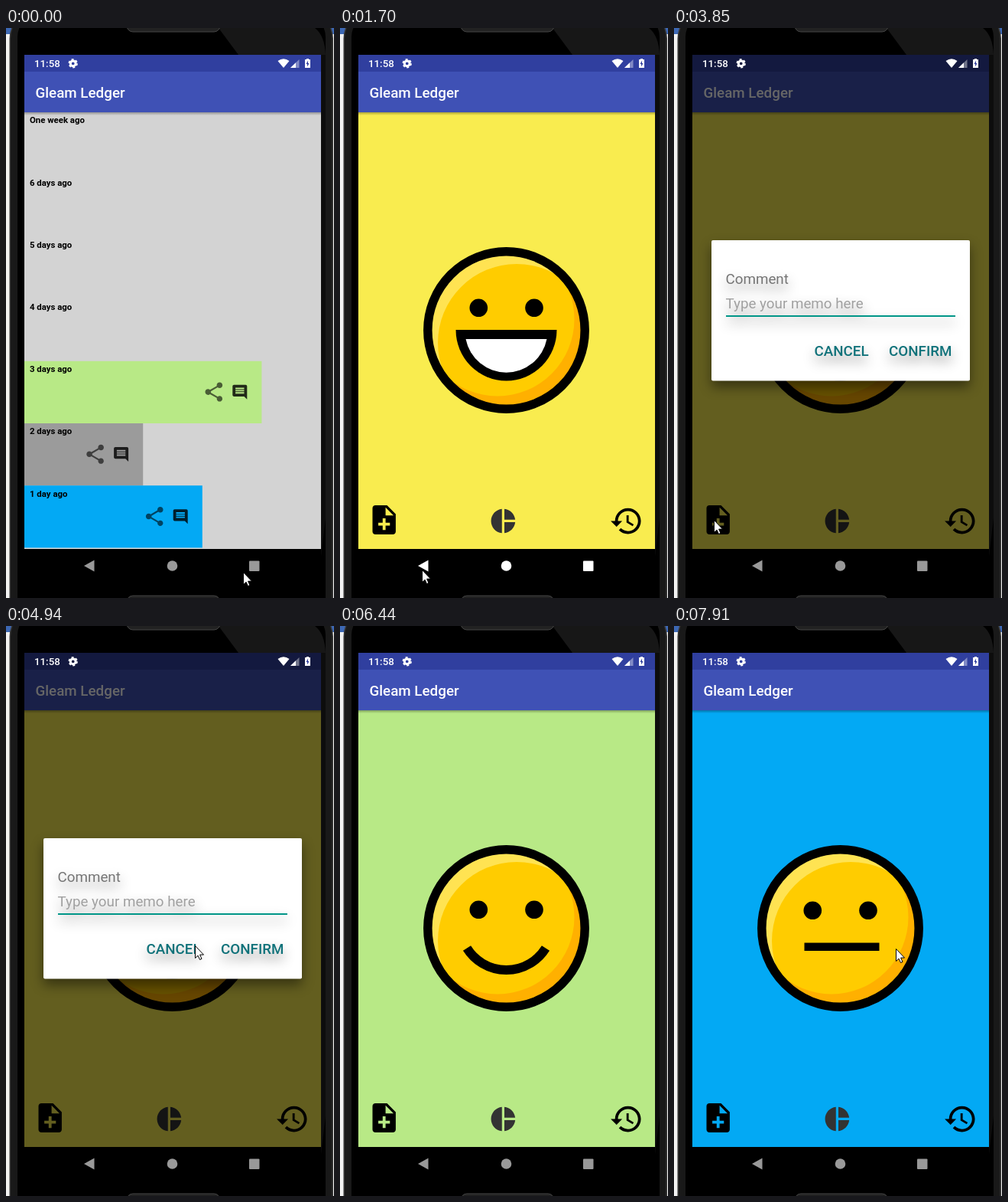
Write an HTML page that moves like this. It is 429 px wide and 744 px high and loops after 8 s.

```html
<!DOCTYPE html>
<html lang="en">
<head>
<meta charset="utf-8">
<title>Gleam Ledger</title>
<style>
html, body { margin: 0; width: 100%; height: 100%; overflow: hidden; background: #f3f3f3; }
svg { display: block; font-family: Roboto, sans-serif; }
.label { font-weight: 700; font-size: 11.4px; }
.big { font-size: 18.8px; }
.medium { font-weight: 500; }
#dialog > g { filter: drop-shadow(0 8px 8px rgba(0, 0, 0, .45)); }
</style>
</head>
<body>
<svg width="429" height="744" viewBox="0 0 429 744">
  <defs>
    <linearGradient id="shade" x2="0" y2="1">
      <stop stop-opacity=".3"/><stop offset="1" stop-opacity="0"/>
    </linearGradient>
    <clipPath id="disc"><circle cx="217.5" cy="394.5" r="99"/></clipPath>
    <path id="share" d="M18 16.08c-.76 0-1.44.3-1.96.77L8.91 12.7c.05-.23.09-.46.09-.7s-.04-.47-.09-.7l7.05-4.11c.54.5 1.25.81 2.04.81 1.66 0 3-1.34 3-3s-1.34-3-3-3-3 1.34-3 3c0 .24.04.47.09.7L8.04 9.81C7.5 9.31 6.79 9 6 9c-1.66 0-3 1.34-3 3s1.34 3 3 3c.79 0 1.5-.31 2.04-.81l7.12 4.16c-.05.21-.08.43-.08.65 0 1.61 1.31 2.92 2.92 2.92s2.92-1.31 2.92-2.92-1.31-2.92-2.92-2.92z"/>
    <path id="memo" d="M22 4c0-1.1-.9-2-2-2H4c-1.1 0-2 .9-2 2v12c0 1.1.9 2 2 2h14l4 4zM18 14H6v-2h12zm0-3H6V9h12zm0-3H6V6h12z"/>
  </defs>

  <!-- phone -->
  <rect width="429" height="8" fill="#3d68b4"/>
  <rect x="4.5" y="-26" width="423.5" height="810" rx="40" fill="#3a3a3a"/>
  <rect x="6" y="-25" width="420.500" height="808" rx="39" fill="#191919"/>
  <rect x="15" y="-20" width="403" height="798" rx="32"/>
  <path d="M278 0H404Q417 10 418 35H304Z" fill="#171717"/>
  <path d="M412 35H418V640L412 690Z" fill="#0d0d0d"/>
  <rect x="158" y="-12" width="122" height="17" rx="8" fill="#222" stroke="#444"/>
  <rect x="158" y="741" width="122" height="17" rx="8" fill="#222" stroke="#444"/>

  <rect id="page" x="24" y="110" width="388" height="570"/>
  <g id="list"></g>

  <g id="mood">
    <g clip-path="url(#disc)">
      <path fill="#ffb000" d="M100 280H340V510H100Z"/>
      <circle cx="206" cy="380" r="100.500" fill="#fc0"/>
      <path fill="#ffe352" fill-rule="evenodd" d="M100 280H340V520H100ZM128 411a103 103 0 0 0 206 0a103 103 0 0 0-206 0Z"/>
    </g>
    <circle cx="217.500" cy="394.500" r="102.700" fill="none" stroke="#000" stroke-width="11.500"/>
    <g id="eyes"><circle cx="181.300" r="11.800"/><circle cx="254" r="11.800"/></g>
    <g id="grin">
      <path d="M151.500 394H283.500A66 66.500 0 0 1 151.500 394Z"/>
      <path fill="#fff" d="M164.500 406H270.500A54 54 0 0 1 164.500 406Z"/>
    </g>
    <path id="smile" fill="none" stroke="#000" stroke-width="12" d="M166 420.500A60.800 60.800 0 0 0 269 420.500"/>
    <path id="flat" d="M170.500 413.500H268.500V424H170.500Z"/>
    <path transform="translate(34.900 619.200) scale(1.900)" d="M14 2H6c-1.100 0-2 .9-2 2v16c0 1.100.9 2 2 2H18c1.100 0 2-.9 2-2V8zm2 14h-3v3h-2v-3H8v-2h3v-3h2v3h3zm-3-7V3.500L18.500 9z"/>
    <path transform="translate(194.400 624.500) scale(1.580)" fill="#333" d="M11 2v20c-5.070-.5-9-4.790-9-10s3.930-9.500 9-10zm2.030 0v8.990H22c-.47-4.740-4.240-8.520-8.970-8.990zm0 11.010V22c4.740-.47 8.500-4.250 8.970-8.990z"/>
    <path transform="translate(352.200 621) scale(1.880)" d="M13 3c-4.970 0-9 4.030-9 9H1l3.890 3.890.07.14L9 12H6c0-3.870 3.130-7 7-7s7 3.130 7 7-3.130 7-7 7c-1.930 0-3.680-.79-4.940-2.060l-1.420 1.420C8.270 19.990 10.510 21 13 21c4.970 0 9-4.030 9-9s-4.030-9-9-9zm-1 5v5l4.280 2.540.72-1.210-3.500-2.080V8z"/>
  </g>

  <!-- app bar -->
  <rect x="24" y="110" width="388" height="4" fill="url(#shade)"/>
  <rect x="24" y="35" width="388" height="22" fill="#303f9f"/>
  <rect x="24" y="57" width="388" height="53" fill="#3f51b5"/>
  <text class="big medium" x="38.500" y="91" fill="#fff">Gleam Ledger</text>

  <g id="dialog">
    <rect x="24" y="35" width="388" height="645" opacity=".6"/>
    <g><rect x="49" y="277" width="338" height="183.500" rx="2" fill="#fff"/></g>
    <g class="big">
      <text x="67.500" y="334" fill="#757575">Comment</text>
      <text x="67.500" y="365.500" fill="#a0a0a0">Type your memo here</text>
      <rect x="68" y="375" width="300" height="2" fill="#009688"/>
      <g class="medium" fill="#10727a">
        <text x="183.500" y="428">CANCEL</text>
        <text x="281" y="428">CONFIRM</text>
      </g>
    </g>
  </g>

  <!-- status bar -->
  <g fill="#fff">
    <text class="medium" x="37" y="51" font-size="13.300">11:58</text>
    <g fill="none" stroke="#fff">
      <circle cx="87.700" cy="46.300" r="3.400" stroke-width="3"/>
      <circle cx="87.700" cy="46.300" r="5.200" stroke-width="2" stroke-dasharray="2.900 2.545"/>
    </g>
    <path d="M355.500 43Q363 37.500 370.500 43L363 52Z"/>
    <path d="M383.500 41V52H372Z" opacity=".4"/>
    <path d="M379 45.300V52H372Z"/>
    <path d="M391 41H393V40H396V41H398V52H391Z"/>
    <path d="M395 42.500L392.500 47H394V50.500L396.500 46H395Z" fill="#303f9f"/>
  </g>

  <!-- navigation -->
  <ellipse id="ripple" cx="109" cy="702.500" rx="47" ry="22.500" fill="#fff" opacity=".15"/>
  <g id="nav">
    <path d="M102 702L115.500 694.500V709.500Z"/>
    <circle cx="217.500" cy="702" r="6.800"/>
    <rect x="318" y="695.500" width="13.500" height="13.500" rx="1"/>
  </g>

  <path id="cursor" fill="#fff" stroke="#000" d="M.5.500V16.500L4.100 13.200L6.500 18.500L9 17.400L6.600 12.100H11.500Z"/>
</svg>

<script>
const $ = id => document.getElementById(id);
const show = (id, on) => $(id).style.display = on ? '' : 'none';

// rows of the week: label, bar width as a share of the page, colour
const rows = [
  ['One week ago'], ['6 days ago'], ['5 days ago'], ['4 days ago'],
  ['3 days ago', .8, '#b8e986'], ['2 days ago', .4, '#9b9b9b'], ['1 day ago', .6, '#03a9f4']
];
$('list').innerHTML = rows.map(([label, part, color], i) => {
  const y = 110 + i * 81.2, right = 24 + 388 * part;
  const bar = part ? `<rect x="24" y="${y}" width="${388 * part}" height="81.2" fill="${color}"/>
    <use href="#share" transform="translate(${right - 77.7} ${y + 25.2}) scale(1.26)" opacity=".6"/>
    <use href="#memo" transform="translate(${right - 40} ${y + 29.1}) scale(.95)" opacity=".82"/>` : '';
  return bar + `<text class="label" x="31" y="${y + 14.3}">${label}</text>`;
}).join('');

// what the page shows: start, colour, mouth, height of the eyes
const pages = [
  [0, '#d3d3d3', 'list', 0],
  [1700, '#f9ec4f', 'grin', 365.3],
  [6440, '#b8e986', 'smile', 370.3],
  [7230, '#03a9f4', 'flat', 371.3]
];

// pointer stops: start, x, y; without a place it is hidden
const stops = [
  [0, 310, 710], [150, 343, 684], [300, 317, 677], [450, 315, 685], [580, 319, 697],
  [730, 201, 706], [880, 145, 709], [1000, 103, 708], [1150, 107, 707],
  [2100, 160, 690], [2220, 204, 668], [2350, 155, 656], [2470, 105, 652],
  [2620, 65, 649], [2740, 38, 647], [2990, 43, 647], [3140, 52, 642],
  [4120, 130, 634], [4240, 235, 596], [4360, 312, 552], [4510, 286, 502], [4640, 258, 460],
  [4790, 248, 419], [4940, 247, 417], [5360, 246, 440], [5510, 260, 477],
  [6320, 258, 430], [6440], [7910, 290, 421]
];

const at = (list, t) => list.findLast(item => item[0] <= t);

function draw() {
  const t = performance.now() % 8000;
  const [, color, view, eyes] = at(pages, t);
  $('page').setAttribute('fill', color);
  for (const id of ['list', 'grin', 'smile', 'flat']) show(id, id === view);
  show('mood', view !== 'list');
  $('eyes').setAttribute('transform', `translate(0 ${eyes})`);

  show('dialog', t >= 3850 && t < 5210);
  show('ripple', t >= 1400 && t < 1700);
  $('nav').setAttribute('fill', t >= 1400 && t < 3700 ? '#fff' : '#999');

  const [, x, y] = at(stops, t);
  show('cursor', x !== undefined);
  if (x !== undefined) $('cursor').setAttribute('transform', `translate(${x} ${y})`);
  requestAnimationFrame(draw);
}
draw();
</script>
</body>
</html>
```
